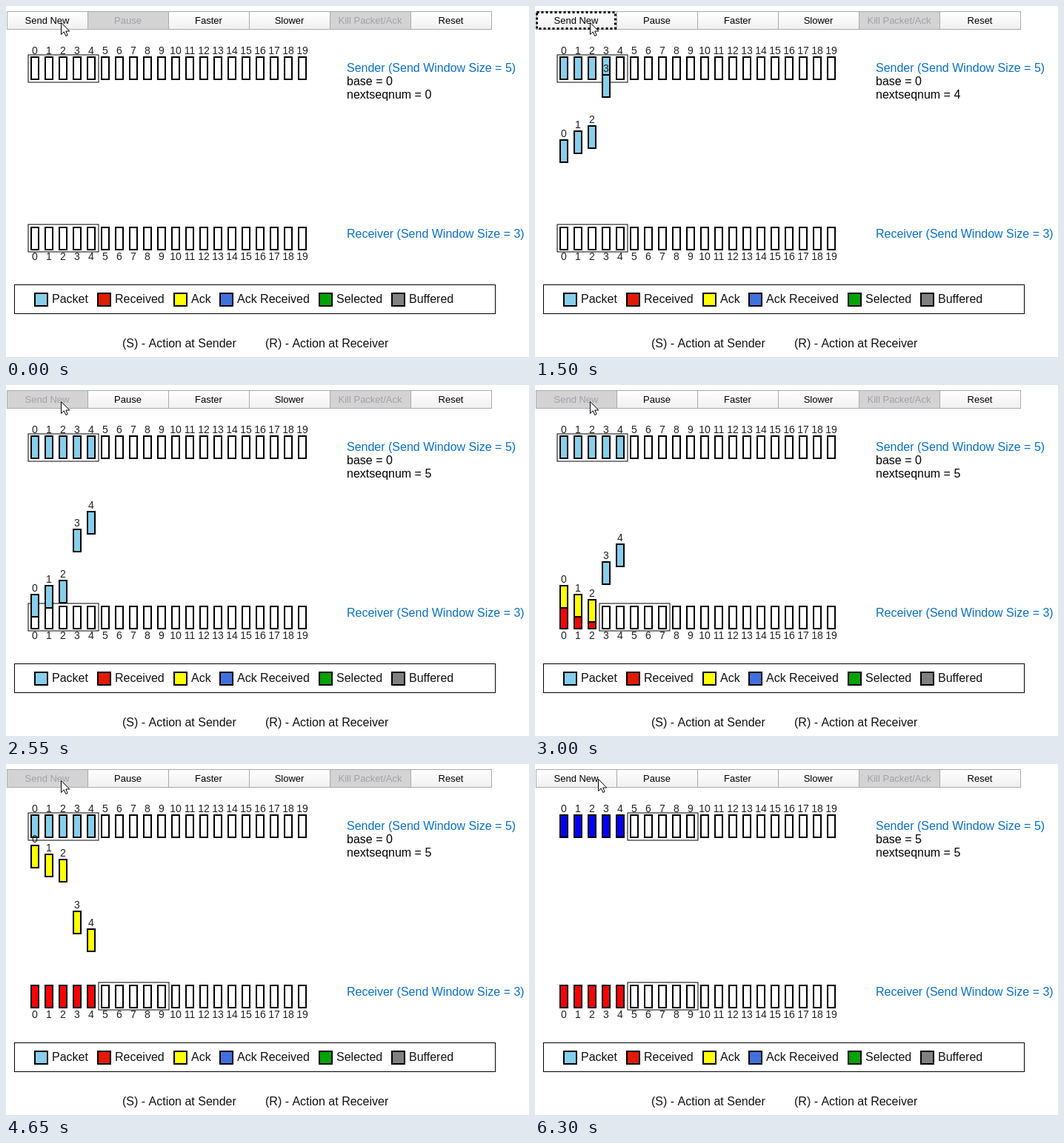
Recreate the animation shown at these times as an HTML page with a canvas. Size 706 by 474 pixels, loop 6.9 s.

```html
<!DOCTYPE html>
<html lang="en">
<head>
<meta charset="utf-8">
<title>Sliding window protocol</title>
<style>
  html, body { margin: 0; width: 100%; height: 100%; overflow: hidden; background: #fff; }
  canvas { display: block; }
</style>
</head>
<body>
<canvas id="stage" width="706" height="474"></canvas>
<script>
const ctx = document.getElementById('stage').getContext('2d');

const LOOP = 6900, TICK = 150;
const SENT_AT = [350, 473, 545, 1258, 1505];
const TRAVEL = 2361;
const SENDER_Y = 68, RECEIVER_Y = 298;
const SLOTS = 20, PITCH = 19, WINDOW = 5;
const PACKET = '#87ceeb', ACK = '#ff0', RECEIVED = '#f00', ACKED = '#00f';
const HEADING = '#0b6fc4';
const LEGEND = [
  [38, PACKET, 'Packet'], [123, '#e11b00', 'Received'], [226, ACK, 'Ack'],
  [288, '#4070dd', 'Ack Received'], [422, '#00a300', 'Selected'], [520, '#808080', 'Buffered']
];

function text(str, x, y, size = 16, color = '#000', align = 'left') {
  ctx.font = `${size}px "Liberation Sans", Arial, sans-serif`;
  ctx.fillStyle = color;
  ctx.textAlign = align;
  ctx.fillText(str, x, y);
}

// Filled box with a 2px black border inside the given bounds
function box(x, y, w, h, fill) {
  ctx.fillStyle = '#000';
  ctx.fillRect(x, y, w, h);
  ctx.fillStyle = fill;
  ctx.fillRect(x + 2, y + 2, w - 4, h - 4);
}

function slot(i, y, fill, labelY = y - 3) {
  const x = 33 + i * PITCH;
  box(x, y, 12, 32, fill);
  text(i, x + 6, labelY, 14, '#222', 'center');
}

function windowFrame(base, y) {
  ctx.lineWidth = 1;
  ctx.strokeStyle = '#000';
  ctx.strokeRect(30 + base * PITCH, y, WINDOW * PITCH, 37);
}

function button(i, label, enabled, focused) {
  const x = 1 + i * 109;
  const shade = ctx.createLinearGradient(0, 8, 0, 31);
  shade.addColorStop(0, '#fff');
  shade.addColorStop(1, '#f0f0f0');
  ctx.fillStyle = enabled ? shade : '#d3d3d3';
  ctx.fillRect(x, 7, 109, 25);
  ctx.lineWidth = 1;
  ctx.strokeStyle = '#aaa';
  ctx.strokeRect(x + .5, 7.5, 109, 24);
  if (focused) {
    ctx.lineWidth = 3;
    ctx.strokeStyle = '#000';
    ctx.setLineDash([3, 3]);
    ctx.strokeRect(x + 1.5, 8.5, 106, 22);
    ctx.setLineDash([]);
  }
  text(label, x + 54.5, 24, 13, enabled ? '#000' : '#a3a0a8', 'center');
}

function cursor(x, y) {
  const arrow = new Path2D('M.5 .5V16.5L4.3 12.9L6.8 18.5L9.2 17.4L6.8 12H11.8Z');
  ctx.save();
  ctx.translate(x, y);
  ctx.fillStyle = '#fff';
  ctx.fill(arrow);
  ctx.lineWidth = 1;
  ctx.strokeStyle = '#000';
  ctx.stroke(arrow);
  ctx.restore();
}

function draw(t) {
  const countAfter = delay => SENT_AT.filter(s => t >= s + delay).length;
  const sent = countAfter(0), received = countAfter(TRAVEL), acked = countAfter(2 * TRAVEL);
  const canSend = sent < acked + WINDOW;

  ctx.fillStyle = '#fff';
  ctx.fillRect(0, 0, 706, 474);

  button(1, 'Pause', sent > 0);
  button(2, 'Faster', true);
  button(3, 'Slower', true);
  button(4, 'Kill Packet/Ack', false);
  button(5, 'Reset', true);
  button(0, 'Send New', canSend, t >= 300 && sent < WINDOW);

  windowFrame(acked, 66);
  windowFrame(received, 295);
  for (let i = 0; i < SLOTS; i++) {
    slot(i, SENDER_Y, i < acked ? ACKED : i < sent ? PACKET : '#fff');
    slot(i, RECEIVER_Y, i < received ? RECEIVED : '#fff', 343);
  }

  // Packets travel down, their acks travel back up
  SENT_AT.forEach((start, i) => {
    const trip = (t - start) / TRAVEL;
    if (trip < 0 || trip >= 2) return;
    const depth = trip < 1 ? trip : 2 - trip;
    slot(i, Math.round(SENDER_Y + depth * (RECEIVER_Y - SENDER_Y)), trip < 1 ? PACKET : ACK);
  });

  text('Sender (Send Window Size = 5)', 460, 89, 16, HEADING);
  text(`base = ${acked}`, 460, 107);
  text(`nextseqnum = ${sent}`, 460, 125);
  text('Receiver (Send Window Size = 3)', 460, 313, 16, HEADING);

  ctx.lineWidth = 1;
  ctx.strokeStyle = '#000';
  ctx.strokeRect(11.5, 376.5, 649, 39);
  for (const [x, color, label] of LEGEND) {
    box(x, 387, 19, 19, color);
    text(label, x + 24, 401, 16, '#111');
  }
  text('(S) - Action at Sender', 157, 461, 16, '#111');
  text('(R) - Action at Receiver', 350, 461, 16, '#111');

  if (t < 6300) cursor(74, 22);
  else cursor(85, 20);
}

const begin = performance.now();
function tick() {
  const t = (performance.now() - begin) % LOOP;
  draw(Math.floor(t / TICK) * TICK);
  requestAnimationFrame(tick);
}
tick();
</script>
</body>
</html>
```
